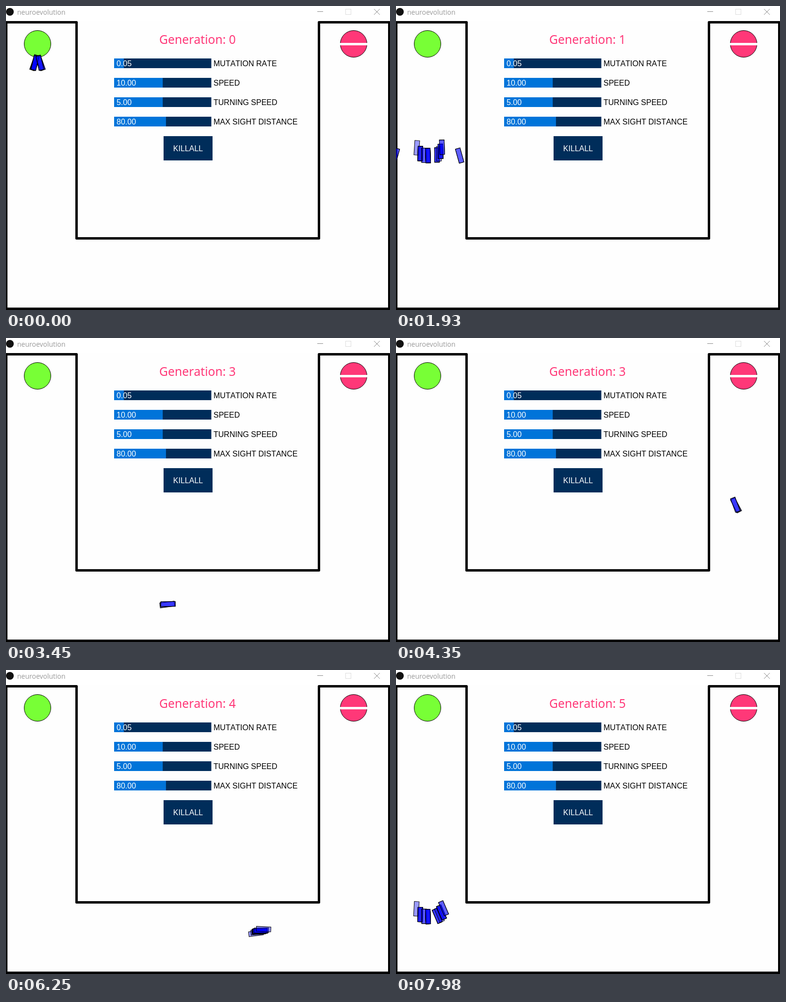
Animation, 792 px wide and 626 px high, one loop 8000 ms. Source, as an HTML page:

```html
<!DOCTYPE html>
<html lang="en">
<head>
<meta charset="utf-8">
<title>neuroevolution</title>
<style>
html, body { margin: 0; width: 100%; height: 100%; overflow: hidden; background: #fff; }
svg { display: block; width: 792px; height: 626px; }
.ui { font: 16px "Liberation Sans", Arial, sans-serif; font-kerning: none; }
.win { font: 14px "Open Sans", sans-serif; fill: #999; }
.gen { font: 24.7px "Noto Sans", sans-serif; font-kerning: none; fill: #ff3878; text-anchor: middle; }
.agent { fill: #00f; fill-opacity: .392; stroke: #000; stroke-width: 1; }
</style>
</head>
<body>
<svg viewBox="0 0 792 626">
  <defs>
    <path id="course" d="M65 100 C78 140 90 200 88 252 C86 290 83 330 83 363 C88 502 83 566 195 558
      S430 541 521 538 C650 533 720 500 722 425 C723 400 713 370 701 345 C680 300 690 190 704 60"/>
    <path id="detour" d="M65 100 C90 170 86 400 88 480 C92 570 215 635 300 545 L360 482"/>
  </defs>
  <rect width="792" height="626" fill="#fff"/>
  <rect y="31" width="792" height="595" fill="#fefefe"/>
  <circle cx="8" cy="12" r="8" fill="#111"/>
  <text class="win" x="23" y="18">neuroevolution</text>
  <g fill="none" stroke="#888">
    <path d="M642 11.5H654M759 6L771 18M771 6L759 18"/>
    <rect x="700.5" y="6.5" width="11" height="11" stroke="#ddd"/>
  </g>
  <path d="M.5 33.5H145.5V478.5H645.5V33.5H790.5V623.5H.5Z" fill="none" stroke="#000" stroke-width="5" stroke-linejoin="round"/>
  <circle cx="65" cy="78" r="27.5" fill="#78ff36" stroke="#000"/>
  <circle cx="717" cy="78" r="27.5" fill="#ff3878" stroke="#000"/>
  <rect x="688" y="76" width="58" height="5" fill="#fefefe"/>
  <text class="gen" id="label" x="395" y="78"></text>
  <g class="ui" id="panel"></g>
  <g id="agents"></g>
</svg>
<script>
const LOOP = 8000, SPAWN = { x: 65, y: 100 }, SLOPE = 0.36, FLOOR = 505, WALL = 72;
const $ = id => document.getElementById(id);
const deg = a => a * 180 / Math.PI;

const sliders = [
  { name: "MUTATION RATE", value: 0.05, max: 0.5 },
  { name: "SPEED", value: 10, max: 20 },
  { name: "TURNING SPEED", value: 5, max: 10 },
  { name: "MAX SIGHT DISTANCE", value: 80, max: 150 }
];
$("panel").innerHTML = sliders.map(({ name, value, max }, i) => {
  const y = 108 + 40 * i;
  return `<rect x="223" y="${y}" width="200.5" height="20" fill="#002d5a"/>
    <rect x="223" y="${y}" width="${200.5 * value / max}" height="20" fill="#0074d9"/>
    <text x="228" y="${y + 16}" fill="#fff">${value.toFixed(2)}</text>
    <text x="428" y="${y + 16}" fill="#000">${name}</text>`;
}).join("") + `<rect x="325" y="268" width="101" height="50" fill="#002d5a"/>
  <text x="375.5" y="299" fill="#fff" text-anchor="middle">KILLALL</text>`;

// start and speed (px per ms) of a run; strays head for the walls, the fan goes down, the pack follows a path
const gens = [
  { at: 0, start: -31, speed: 0.55, strays: 3, fan: [0, 2],
    pack: { path: $("detour"), count: 2, spread: 15, turn: -5 } },
  { at: 1490, start: 1590, speed: 0.61, strays: 2, fan: [0, 8], life: 377 },
  { at: 2210 },
  { at: 2310, start: 2306, speed: 0.587, fan: [7, 8], wide: 1.8, lean: -28, life: 300,
    pack: { path: $("course"), count: 3, spread: 1, turn: 4 } },
  { at: 4760, start: 4860, speed: 0.62, strays: 2, fan: [0, 8], lean: 5,
    pack: { path: $("course"), count: 9, spread: 8, turn: 5 } },
  { at: 7220, start: 7320, speed: 0.617, strays: 2, fan: [0, 8], lean: 23 }
];

const box = (x, y, rot, copies = 1) =>
  `<rect class="agent" x="-5" y="-15" width="10" height="30" transform="translate(${x.toFixed(2)} ${y.toFixed(2)}) rotate(${rot.toFixed(2)})"/>`.repeat(copies);

// Leaves the spawn at a fixed slope and levels out at a sideways drift
function faller(u, drift, lag, tilt, copies) {
  const fade = Math.exp(-u * SLOPE / Math.abs(drift)), dx = drift * (1 - fade);
  if (Math.abs(dx) > WALL) return "";
  const part = Math.min(1, u / 150);
  const rot = tilt * part - deg(Math.atan(Math.sign(drift) * SLOPE * fade));
  return box(SPAWN.x + dx, SPAWN.y + u - lag * part, rot, copies);
}

function drawFan({ fan: [from, to], strays = 0, wide = 1, lean = 0, life = FLOOR }, u) {
  if (u > life) return "";
  let out = faller(u, -300, 0, 0, strays) + faller(u, 300, 0, 0, strays);
  for (let i = from; i < to; i++) {
    const right = i > 3;
    const side = right ? 20 + 4.5 * (i - 4) : 8 * i - 23;
    const lag = 16 * ((side - 5) / 28) ** 4;
    out += faller(u, side * wide, lag, right ? -lean : 3 - 1.7 * i, 1 + 3 * i % 5);
  }
  return out;
}

function drawPack({ path, count, spread, turn }, s) {
  if (s > path.getTotalLength()) return "";
  const a = path.getPointAtLength(Math.max(0, s - 1)), b = path.getPointAtLength(s + 1);
  const p = path.getPointAtLength(s);
  const dir = Math.atan2(b.y - a.y, b.x - a.x), c = Math.cos(dir), n = Math.sin(dir);
  const ramp = Math.min(1, s / 600);
  let out = "";
  for (let i = 0; i < count; i++) {
    const k = (2 * i / (count - 1) - 1) ** 3 * ramp;
    const along = spread * k, across = -along / 2;
    out += box(p.x + along * c - across * n, p.y + along * n + across * c, deg(dir) + 90 + turn * k);
  }
  return out;
}

function render(t) {
  const n = gens.filter(g => g.at <= t).length - 1, gen = gens[n];
  const u = Math.max(0, (t - gen.start) * gen.speed);
  $("label").textContent = "Generation: " + n;
  $("agents").innerHTML = (gen.fan ? drawFan(gen, u) : "") + (gen.pack ? drawPack(gen.pack, u) : "");
}

const began = performance.now();
function tick() {
  render((performance.now() - began) % LOOP);
  requestAnimationFrame(tick);
}
render(0);
requestAnimationFrame(tick);
</script>
</body>
</html>
```
